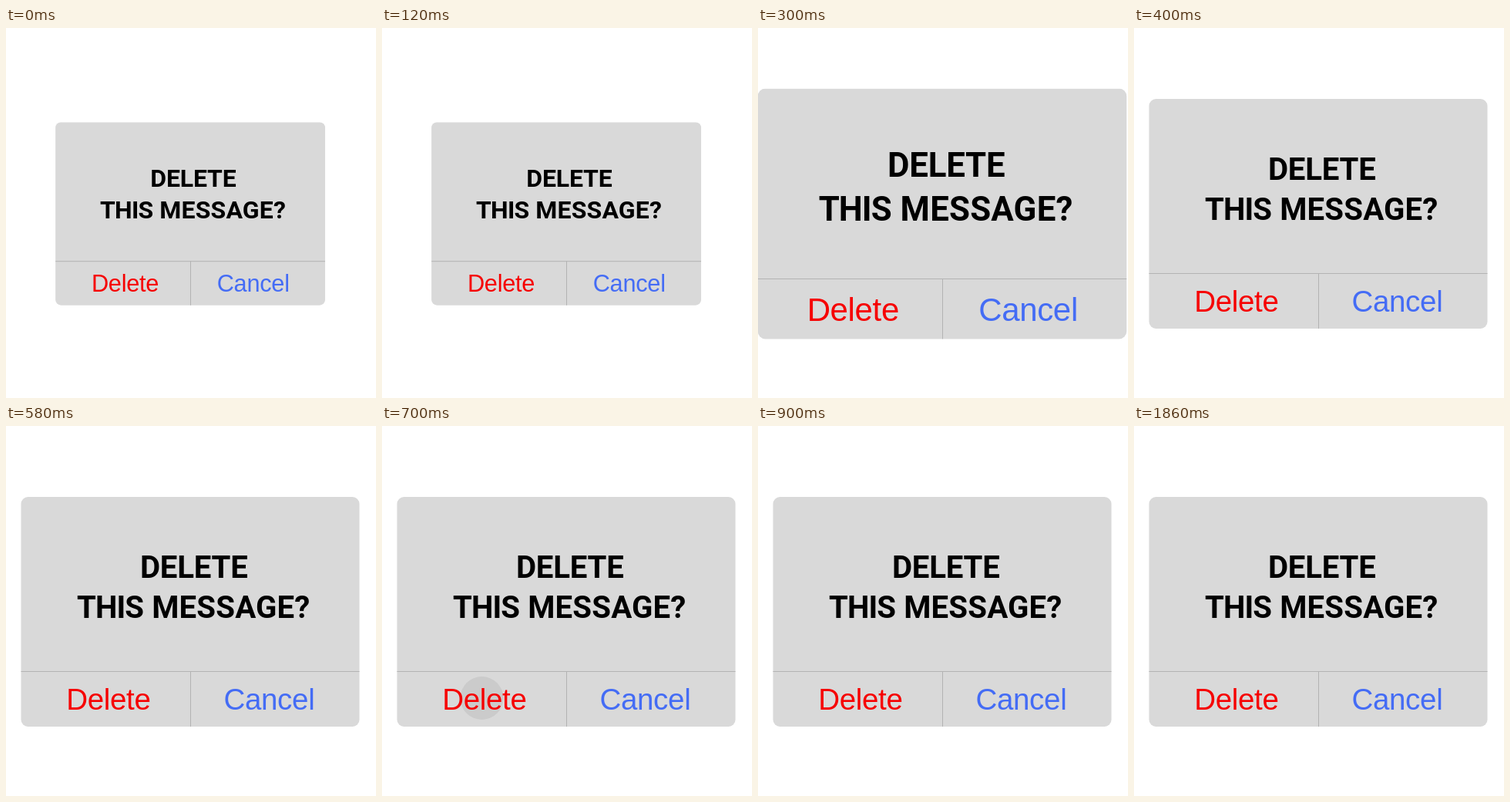
These frames come from a looping animation (480x480 px, 2500 ms). An HTML page:

```html
<!DOCTYPE html>
<html lang="en">
<head>
<meta charset="utf-8">
<title>Delete dialog</title>
<style>
  html, body { margin: 0; width: 100%; height: 100%; overflow: hidden; background: #fff; }
  svg { display: block; width: 100%; height: 100%; }

  .dialog {
    transform-box: view-box;
    transform-origin: 239.5px 240.8px;
    animation: pop 2500ms step-end infinite;
  }
  .panel { fill: #d9d9d9; }
  .rule { stroke: #b3b3b3; stroke-width: 1; vector-effect: non-scaling-stroke; }
  .ripple { fill: #cbcbcb; r: 0; animation: press 2500ms step-end infinite; }

  text { text-anchor: middle; }
  .title { font: 700 40.2px Roboto, sans-serif; letter-spacing: -.2px; word-spacing: 1.2px; }
  .tight { letter-spacing: -.9px; }
  .loose { letter-spacing: .2px; }
  .button { font: 38.5px "Liberation Sans", Arial, sans-serif; letter-spacing: -.3px; }
  .delete { fill: #f60000; }
  .cancel { fill: #446cf5; }

  /* Grow, overshoot, settle */
  @keyframes pop {
    0%  { transform: scale(.797); }
    8%  { transform: scale(.918); }
    12% { transform: scale(1.09); }
    16%, 100% { transform: scale(1); }
  }
  @keyframes press {
    0%  { r: 0; }
    28% { r: 28px; }
    32% { r: 89px; }
    36%, 100% { r: 0; }
  }
</style>
</head>
<body>
<svg viewBox="0 0 480 480">
  <clipPath id="left-button"><rect x="19.5" y="319" width="220" height="71"/></clipPath>
  <g class="dialog">
    <rect class="panel" x="19.5" y="92" width="439" height="298" rx="9"/>
    <g clip-path="url(#left-button)"><circle class="ripple" cx="129.5" cy="353"/></g>
    <line class="rule" x1="19.5" y1="318.5" x2="458.5" y2="318.5"/>
    <line class="rule" x1="239.5" y1="318.5" x2="239.5" y2="390"/>
    <text class="title" x="243.8" y="196.9">DELETE</text>
    <text class="title" x="243.3" y="249.1"><tspan class="tight">THIS</tspan> <tspan class="loose">MESSAGE?</tspan></text>
    <text class="button delete" x="132.9" y="368.1">Delete</text>
    <text class="button cancel" x="341.4" y="368.1">Cancel</text>
  </g>
</svg>
</body>
</html>
```
